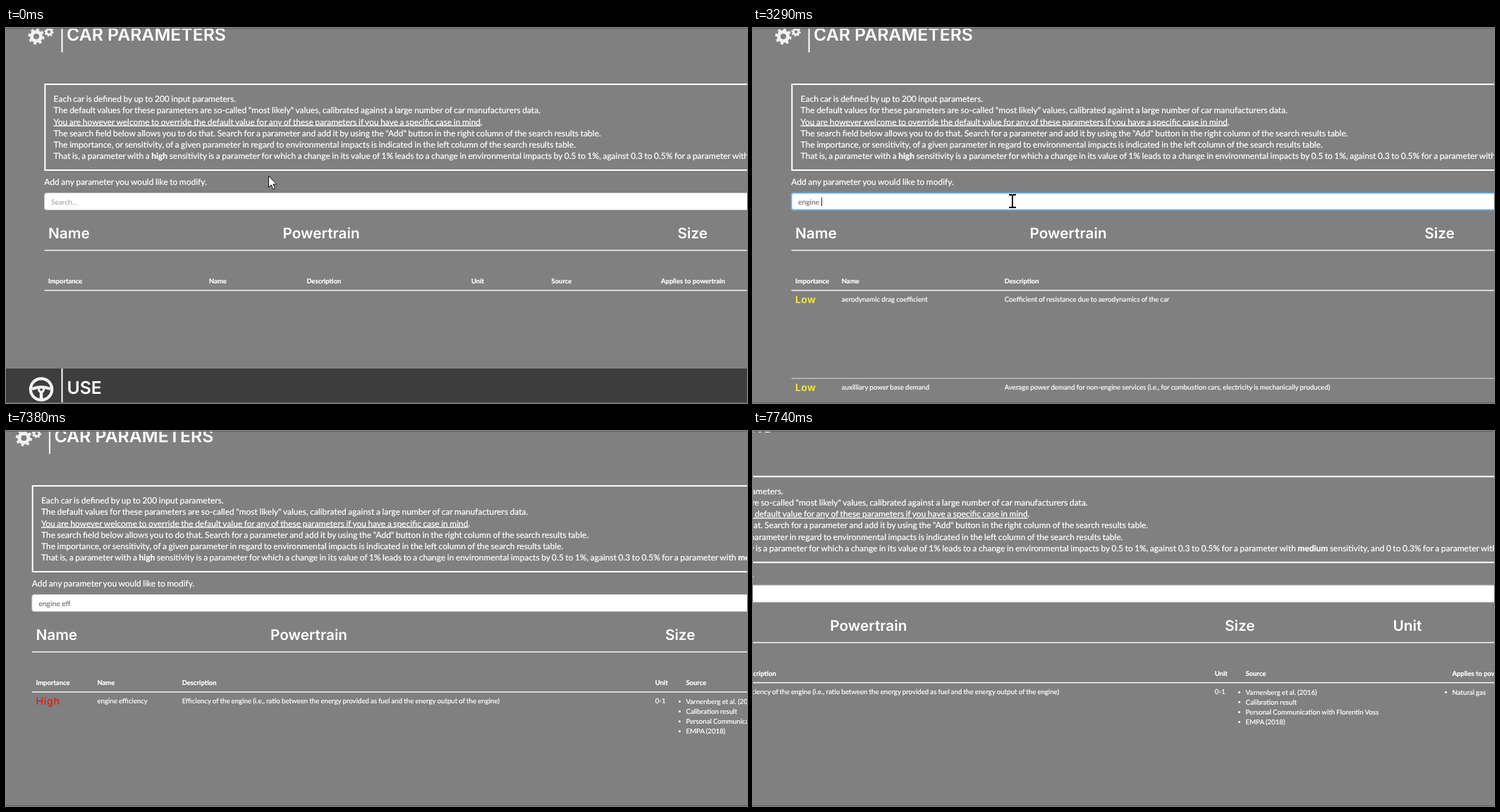
Write an HTML page that moves like this. It is 1051 by 533 pixels and loops after 8 s.

```html
<!DOCTYPE html>
<html lang="en">
<head>
<meta charset="utf-8">
<title>Car parameters</title>
<style>
  html, body { margin: 0; width: 100%; height: 100%; overflow: hidden; background: #808080; }
  svg { display: block; width: 100vw; height: 100vh; }
  text { font-family: Lato, sans-serif; fill: #fff; white-space: pre; text-rendering: geometricPrecision; }
  .title { font: 600 24.8px Inter, sans-serif; }
  .head { font: 600 20.8px Inter, sans-serif; }
  .level { font: 500 14.2px Inter, sans-serif; letter-spacing: .3px; }
  .body { font-size: 12px; word-spacing: -.55px; }
  .field { font-size: 10.3px; fill: #555; }
  .hint { font-size: 10.1px; fill: #999; }
  .th { font-size: 9.45px; font-weight: 700; }
  .td { font-size: 9.72px; word-spacing: -.4px; }
  .body, .td, .th { stroke: #fff; stroke-width: .22px; }
  .bold { font-weight: 700; }
  .under { text-decoration: underline; }
</style>
</head>
<body>
<svg viewBox="0 0 1051 533" preserveAspectRatio="none">
  <rect width="1051" height="533" fill="#808080"/>
  <g id="page">
    <g id="cogs" fill="none" stroke="#f2f2f2">
      <circle cx="43" cy="12" r="6.6" stroke-width="5"/>
      <circle cx="43" cy="12" r="10" stroke-width="3.2" pathLength="16" stroke-dasharray="1 1"/>
      <circle cx="61" cy="5.5" r="3.8" stroke-width="3"/>
      <circle cx="61" cy="5.5" r="5.8" stroke-width="2" pathLength="16" stroke-dasharray="1 1"/>
    </g>
    <rect x="78.5" y="-30" width="2" height="64.5" fill="#fff"/>
    <text class="title" x="86" y="17.5">CAR PARAMETERS</text>
    <rect x="55.3" y="80" width="1900" height="122" fill="none" stroke="#fff" stroke-width="2"/>
    <g id="intro"></g>
    <text class="body" x="54.3" y="223">Add any parameter you would like to modify.</text>

    <rect x="54.5" y="234.5" width="1900" height="24" rx="3" fill="#fff" stroke="#ccc"/>
    <g id="glow" fill="none" stroke="#66afe9">
      <rect x="54.5" y="234.5" width="1900" height="24" rx="3" stroke-width="3.5" stroke-opacity=".35"/>
      <rect x="54.5" y="234.5" width="1900" height="24" rx="3"/>
    </g>
    <text id="hint" class="hint" x="64" y="251">Search...</text>
    <text id="typed" class="field" x="64" y="251"></text>
    <rect id="caret" y="241" width="1" height="12" fill="#222"/>

    <text class="head" x="60" y="299">Name</text>
    <text class="head" x="392.5" y="299">Powertrain</text>
    <text class="head" x="952.5" y="299">Size</text>
    <text class="head" x="1191" y="299">Unit</text>
    <rect x="54.5" y="315.2" width="1900" height="1.6" fill="#eee"/>
    <rect x="54.5" y="372.2" width="1900" height="1.6" fill="#eee"/>
    <g id="tables"></g>

    <g id="use">
      <rect y="484" width="1051" height="60" fill="#3d3d3d"/>
      <rect x="78.5" y="484" width="2" height="60" fill="#fff"/>
      <g stroke="#f2f2f2" fill="none">
        <circle cx="50" cy="513.5" r="15.2" stroke-width="4.2"/>
        <path d="M37 513Q50 508 63 513M50 514V527" stroke-width="4.5"/>
      </g>
      <circle cx="50" cy="514" r="5" fill="#f2f2f2"/>
      <circle cx="50" cy="514" r="1.8" fill="#3d3d3d"/>
      <text class="title" x="86.5" y="520.3">USE</text>
    </g>
  </g>
  <path id="arrow" d="M.5 .5V16.5L4.2 13L7 19.3L9.6 18.2L6.9 12H11.8Z" fill="#fff" stroke="#111"/>
  <path id="beam" d="M-5 -9H-1.5L0 -8L1.5 -9H5M0 -8V8M-5 9H-1.5L0 8L1.5 9H5" fill="none" stroke="#000" stroke-width="1.8"/>
  <path d="M0 .5H1051M0 532.5H1051" fill="none" stroke="#606060"/>
</svg>
<script>
const LOOP = 8000;
const $ = id => document.getElementById(id);

// The last entry whose time has come.
const at = (steps, t) => steps.filter(s => s[0] <= t).pop();

const text = (cls, x, y, s) => `<text class="${cls}" x="${x}" y="${y}">${s}</text>`;

const bold = s => `<tspan class="bold">${s}</tspan>`;
const INTRO = [
  'Each car is defined by up to 200 input parameters.',
  'The default values for these parameters are so-called "most likely" values, calibrated against a large number of car manufacturers data.',
  '<tspan class="under">You are however welcome to override the default value for any of these parameters if you have a specific case in mind</tspan>.',
  'The search field below allows you to do that. Search for a parameter and add it by using the "Add" button in the right column of the search results table.',
  'The importance, or sensitivity, of a given parameter in regard to environmental impacts is indicated in the left column of the search results table.',
  `That is, a parameter with a ${bold('high')} sensitivity is a parameter for which a change in its value of 1% leads to a change in environmental impacts by 0.5 to 1%, against 0.3 to 0.5% for a parameter with ${bold('medium')} sensitivity, and 0 to 0.3% for a parameter with ${bold('low')} sensitivity.`
];
$('intro').innerHTML = INTRO.map((s, i) => text('body', 67.6, 105 + i * 16.25, s)).join('');

const HEADERS = ['Importance', 'Name', 'Description', 'Unit', 'Source', 'Applies to powertrain'];
const DRAG = ['Low', 'aerodynamic drag coefficient', 'Coefficient of resistance due to aerodynamics of the car'];
const AUX = ['Low', 'auxilliary power base demand', 'Average power demand for non-engine services (i.e., for combustion cars, electricity is mechanically produced)'];
const ENGINE = ['High', 'engine efficiency', 'Efficiency of the engine (i.e., ratio between the energy provided as fuel and the energy output of the engine)', '0-1',
  ['Varnenberg et al. (2016)', 'Calibration result', 'Personal Communication with Florentin Voss', 'EMPA (2018)'],
  ['Natural gas']];

// Column positions, rows, and where the second row begins.
const TABLES = [
  { from: 0, cols: [60, 288, 426.5, 660, 773.5, 929], rows: [] },
  { from: 2430, cols: [60, 125.7, 395], rows: [DRAG, AUX], split: 498 },
  { from: 2750, cols: [60, 125.7, 356.7], rows: [DRAG, AUX], split: 498 },
  { from: 3440, cols: [60, 138, 287, 958, 1002], rows: [AUX, ENGINE.slice(0, 4)], split: 484 },
  { from: 3900, cols: [60, 147, 267.3, 938.3, 982, 1275], rows: [ENGINE] }
];

const list = (items, x, y) => items.map((s, i) =>
  `<circle cx="${x - 9}" cy="${y - 2.8 + i * 14.1}" r="1.5" fill="#fff"/>` + text('td', x, y + .7 + i * 14.1, s)).join('');

function cell(value, i, x, y) {
  if (Array.isArray(value)) return list(value, x, y);
  if (i) return text('td', x, y, value);
  const look = value === 'High' ? 'fill:#f00;font-weight:400;letter-spacing:.8px' : 'fill:#fbee35;font-weight:600';
  return `<text class="level" x="${x}" y="${y + 1.8}" style="${look}">${value}</text>`;
}

function drawTable({ cols, rows, split }) {
  const head = cols.map((x, i) => text('th', x, 363.3, HEADERS[i])).join('');
  const cells = rows.map((row, r) => {
    const y = r ? split + 16 : 389.3;
    return row.map((v, i) => cell(v, i, cols[i], y)).join('');
  }).join('');
  const rule = split ? `<rect x="54.5" y="${split - .5}" width="1900" height="1" fill="#ddd"/>` : '';
  return `<g>${head}${cells}${rule}</g>`;
}
$('tables').innerHTML = TABLES.map(drawTable).join('');
const tables = [...$('tables').children];

const TYPING = [[0, ''], [2130, 'e'], [2430, 'en'], [2900, 'eng'], [2980, 'engi'], [3060, 'engin'],
  [3210, 'engine'], [3290, 'engine '], [3440, 'engine e'], [3670, 'engine ef'], [3900, 'engine eff']];
const CARET = [[0, 0], [1430, 1], [1960, 0], [2130, 1], [4450, 0], [4910, 1], [5430, 0], [6020, 1], [6550, 0]];
const GLOW = [[0, 0], [1590, .5], [1650, 1], [7080, .5], [7170, 0]];
const SCROLL = [[0, 0, 0], [7380, 17.6, 2], [7430, 64, 4], [7490, 119.4, 6.5], [7580, 183, 10], [7660, 236, 13], [7740, 283.3, 15.3]];

// Pointer: time, shape, x, y
const POINTER = [[0, 'arrow', 372, 210]];
for (let i = 0; i < 11; i++) {
  const k = (i + 1) / 11, y = 210 + 36 * k * (2 - k);
  POINTER.push([660 + i * 77, y < 234 ? 'arrow' : 'beam', 372 - 4 * k, y]);
}
POINTER.push([5080, 'beam', 371, 252], [5150, 'arrow', 381, 286], [5230, 'arrow', 399, 345],
  [5310, 'arrow', 411, 404], [5390, 'arrow', 404, 441], [5460, 'arrow', 397, 455],
  [5690, 'arrow', 420, 330], [5770, 'arrow', 466, 76], [5840, 'none', 0, 0]);

const show = (el, on) => el.setAttribute('visibility', on ? 'visible' : 'hidden');

function draw(t) {
  const [, dx, dy] = at(SCROLL, t);
  $('page').setAttribute('transform', `translate(${-dx} ${-dy})`);

  const active = TABLES.filter(s => s.from <= t).length - 1;
  tables.forEach((g, i) => show(g, i === active));
  show($('use'), active === 0);

  const typed = at(TYPING, t)[1];
  $('typed').textContent = typed;
  show($('hint'), !typed);
  $('caret').setAttribute('x', typed ? Math.round(64 + $('typed').getComputedTextLength()) : 64);
  show($('caret'), at(CARET, t)[1]);
  $('glow').setAttribute('opacity', at(GLOW, t)[1]);

  const [, shape, x, y] = at(POINTER, t);
  for (const id of ['arrow', 'beam']) {
    show($(id), id === shape);
    $(id).setAttribute('transform', `translate(${Math.round(x)} ${Math.round(y)})`);
  }
}

const start = performance.now();
function tick() {
  draw((performance.now() - start) % LOOP);
  requestAnimationFrame(tick);
}
tick();
</script>
</body>
</html>
```
